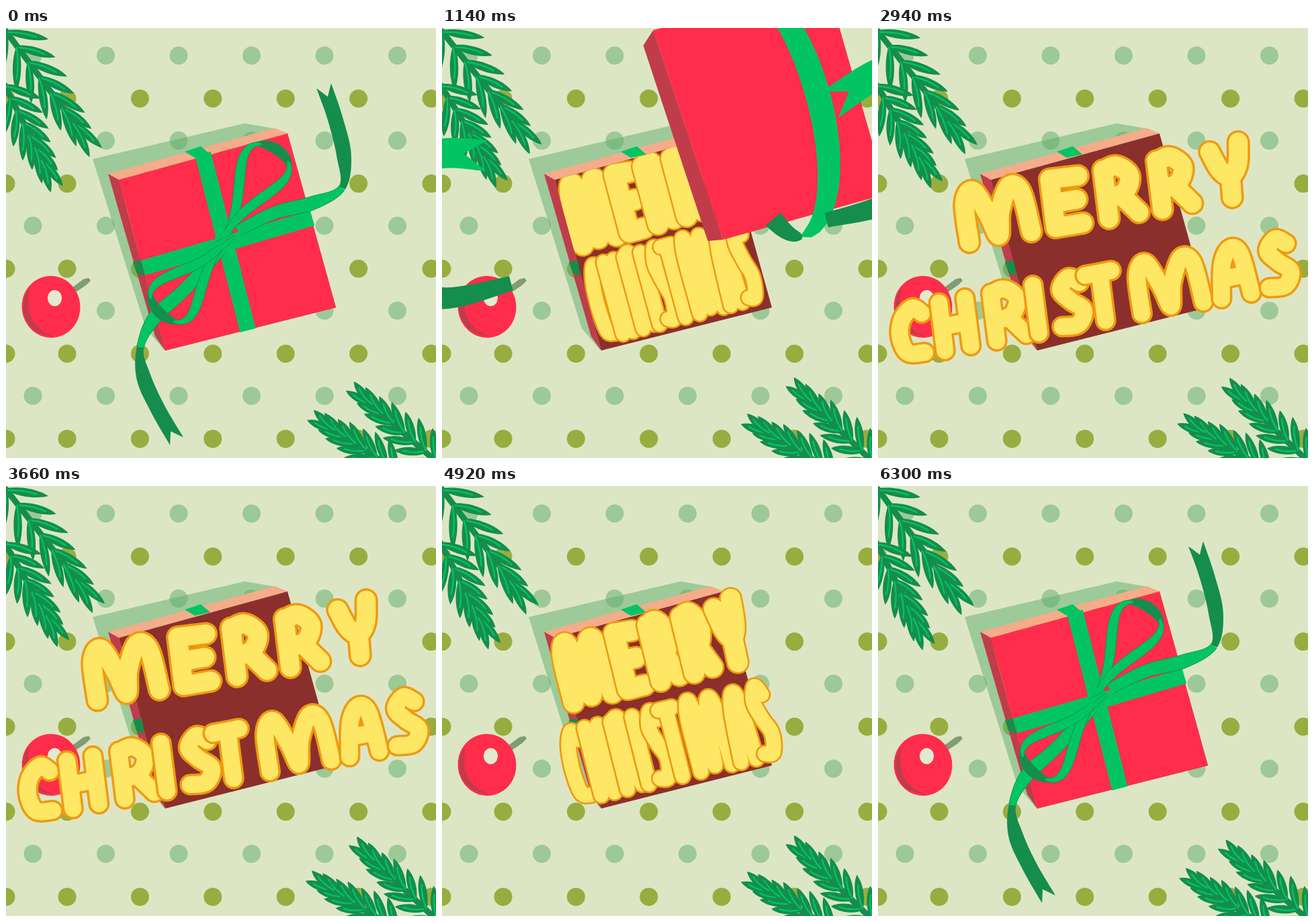
Animation, 640 px wide and 640 px high, one loop 6.42 s. Source, as an HTML page with a canvas:

```html
<!DOCTYPE html>
<html lang="en">
<head>
<meta charset="utf-8">
<title>Gift box</title>
<style>
html, body { margin: 0; width: 100%; height: 100%; overflow: hidden; background: #dde6c4; }
canvas { display: block; width: 640px; height: 640px; }
</style>
</head>
<body>
<canvas id="stage" width="640" height="640" role="img" aria-label="Merry Christmas"></canvas>
<script>
const ctx = document.getElementById('stage').getContext('2d');
const LOOP = 6420, STEP = 60, LAST = 6300;
const BRIGHT = [2, 196, 99], DARK = [20, 141, 77];
const RED = '#ff2d4b', SIDE = '#c03c4a', BROWN = '#8b2f2d', SEAM = '#0c9650';

// ---------- helpers ----------
const rgb = c => `rgb(${c.map(Math.round)})`;
const ramp = (t, a, b) => Math.min(1, Math.max(0, (t - a) / (b - a)));
const ease = k => k * k * (3 - 2 * k);
const lerp = (a, b, k) => a + (b - a) * k;
const mixPt = (p, q, k) => p.map((v, i) => lerp(v, q[i], k));
const mix = (a, b, k) => a.map((p, i) => mixPt(p, b[i], k));
const move = (pts, x, y) => pts.map(p => [p[0] + x, p[1] + y, ...p.slice(2)]);
const points = text => text.split(' ').map(p => p.split(',').map(Number));
const range = (n, f) => Array.from({ length: n + 1 }, (_, i) => f(i / n));

// Catmull-Rom through points of any dimension
function spline(pts, n = 9) {
  const out = [], at = i => pts[Math.min(pts.length - 1, Math.max(0, i))];
  const blend = (a, b, c, d, k) => {
    const cubic = 3 * (b - c) + d - a;
    const square = 2 * a - 5 * b + 4 * c - d;
    return b + k / 2 * (c - a + k * (square + k * cubic));
  };
  for (let i = 0; i < pts.length - 1; i++) {
    const [a, b, c, d] = [at(i - 1), at(i), at(i + 1), at(i + 2)];
    for (let s = 0; s < n; s++) out.push(b.map((v, j) => blend(a[j], v, c[j], d[j], s / n)));
  }
  out.push(at(pts.length - 1));
  return out;
}

function line(pts) {
  pts.forEach((p, i) => i ? ctx.lineTo(p[0], p[1]) : ctx.moveTo(p[0], p[1]));
}
function stroke(color, width) {
  ctx.strokeStyle = color;
  ctx.lineWidth = width;
  ctx.stroke();
}
function poly(pts, fill) {
  ctx.beginPath();
  line(pts);
  ctx.closePath();
  ctx.fillStyle = fill;
  ctx.fill();
}
function oval(x, y, rx, ry, fill, turn = 0) {
  ctx.beginPath();
  ctx.ellipse(x, y, rx, ry, turn, 0, 7);
  ctx.fillStyle = fill;
  ctx.fill();
}

// Ribbon along close points [x, y, width]
function band(path, color, { notch = false, edge = false } = {}) {
  const left = [], right = [], cut = [], last = path.length - 1;
  path.forEach((p, i) => {
    const a = path[Math.max(i - 1, 0)], b = path[Math.min(i + 1, last)];
    const dx = b[0] - a[0], dy = b[1] - a[1];
    const h = Math.max(p[2], 0) / 2 / (Math.hypot(dx, dy) || 1);
    left.push([p[0] - dy * h, p[1] + dx * h]);
    right.push([p[0] + dy * h, p[1] - dx * h]);
  });
  if (notch) {
    const e = path[last], b = path[last - 3];
    const d = e[2] * .75 / (Math.hypot(e[0] - b[0], e[1] - b[1]) || 1);
    cut.push(mixPt(e, b, d));
  }
  poly([...left, ...cut, ...right.slice().reverse()], rgb(color));
  if (edge) {
    ctx.beginPath();
    line(left);
    line(right);
    stroke(SEAM, 1);
  }
}

// ---------- scenery ----------
function backdrop() {
  ctx.fillStyle = '#dde6c4';
  ctx.fillRect(0, 0, 640, 640);
  for (let row = 0; row < 5; row++) {
    const y = 41 + row * 126.6;
    for (let i = 0; i < 6; i++) {
      oval(40 + i * 108.5, y, 13.5, 13.5, '#9cc997');
      oval(91 + i * 108.4, y + 64, 13.5, 13.5, '#98ad40');
    }
    oval(0, y + 64, 13.5, 13.5, '#98ad40');
  }
}

function leaf(x, y, angle, len) {
  ctx.save();
  ctx.translate(x, y);
  ctx.rotate(angle);
  ctx.beginPath();
  ctx.moveTo(-4, 0);
  ctx.bezierCurveTo(len * .3, -10, len * .8, -7, len, 0);
  ctx.bezierCurveTo(len * .75, 7, len * .3, 9, -4, 0);
  ctx.fillStyle = rgb(DARK);
  ctx.fill();
  ctx.beginPath();
  ctx.moveTo(2, 1);
  ctx.quadraticCurveTo(len * .4, -3.5, len * .72, 0);
  stroke(rgb(BRIGHT), 2.4);
  ctx.restore();
}

function branch(x, y, dx, dy, len, turn) {
  const dir = Math.atan2(dy, dx), pairs = 6;
  ctx.save();
  ctx.translate(x, y);
  ctx.rotate(turn * Math.PI / 180);
  ctx.lineCap = 'round';
  ctx.beginPath();
  line([[0, 0], [dx, dy]]);
  stroke(rgb(DARK), 9);
  for (let i = 0; i <= pairs; i++) {
    const k = i / pairs, spread = lerp(.75, .2, k);
    for (const side of [-1, 1]) {
      leaf(dx * k, dy * k, dir + side * spread, len * (1 - .1 * k + .06 * side * (i % 2)));
    }
  }
  ctx.restore();
}

// time, left sway, right sway
const SWAY = [[0, 0, 0], [720, 1, 1], [1860, .5, .5], [2940, .75, .75], [4320, .5, .5], [5280, 0, 1], [6300, 0, 0]];

function branches(t) {
  const next = Math.max(1, SWAY.findIndex(s => s[0] >= t));
  const [a, b] = [SWAY[next - 1], SWAY[next]];
  const [, l, r] = mixPt(a, b, ease(ramp(t, a[0], b[0])));
  branch(0, 5, 100, 135, 64, -2.3 * l);
  branch(-2, 85, 55, 110, 57, -6 * l);
  branch(640, 645, -95, -83, 50, 3.5 * r);
  branch(582, 660, -92, -60, 50, -3 * r);
}

function bauble() {
  poly(points('99,386 115,374 123,372 126,376 119,383 104,393'), '#7f9c74');
  oval(67, 415, 43.5, 46, RED, -.1);
  ctx.beginPath();
  ctx.moveTo(35, 387);
  ctx.bezierCurveTo(15, 415, 28, 458, 70, 458);
  ctx.bezierCurveTo(40, 448, 28, 425, 35, 387);
  ctx.fillStyle = SIDE;
  ctx.fill();
  oval(72.5, 402, 10.5, 12, '#e3ead0');
}

// ---------- box ----------
const FRONT = points('168,226 419,157 491,416 237,480');
const FLANK = points('152,217 168,226 237,480 222,459');
const LID = points('183,180 444,121 531,424 287,492');
const LID_FLANK = points('168,203 183,180 287,492 264,494');

function box() {
  poly(points('129,195 355,142 402,150 300,300 236,480 208,447'), 'rgba(95,176,110,.5)');
  poly(points('152,217 400,149 420,157 168,226'), '#f5ac8a');
  poly(FRONT, BROWN);
  poly(FLANK, SIDE);
  poly(points('266,184 290,176 304,188 281,193'), rgb(BRIGHT));
  poly(points('189,348 202,346 206,369 194,364'), rgb(DARK));
}

// ---------- lettering: advance and strokes on a grid ten units high ----------
const GLYPHS = {
  M: [12.8, '0,10 0,2 2,-.3 4.5,5 6.1,9.6 7,4.7 9.4,0 11.7,1.6 12.8,10'],
  E: [6, '0,0 0,10', '0,0 5.8,.3', '0,5 5,5', '0,10 5.6,10'],
  R: [6, '0,0 0,10', '0,.2 2.8,-.4 5.2,2 4,5 1.5,5.8', '3,5.6 6.2,9.8'],
  Y: [6, '0,0 1.6,4 3.6,5.6 5.3,3.5 6,-1', '3.6,5.6 3.4,10'],
  C: [5, '5,1.4 3.2,0 .8,2 0,5.5 1.2,9 4.6,9.6'],
  H: [7, '0,0 0,10', '5.4,0 5.4,10', '0,5 5.4,5'],
  I: [.1, '-1,0 -1,10'],
  S: [4.8, '4.6,1.2 2.5,-.2 .6,2 2.4,4.6 4.8,7 3.4,9.7 0,9.6'],
  T: [4.2, '-2.6,0 2.8,0', '.4,0 .4,10'],
  A: [6.2, '0,10 1,3 3,0 5,1.6 6.2,10', '.6,6 5.6,6']
};
// Frames: origin, along the line, down the letters
const WORDS = [
  { text: 'MERRY', gap: 5, pen: [35, 35],
    packed: points('187,237 220,-61 23,86'), open: points('127,247 410,-70 9,72') },
  { text: 'CHRISTMAS', gap: 3.8, pen: [26, 32],
    packed: points('216,355 226,-60 29,107'), open: points('28,421 580,-109 9,71') }
];

function drawWord({ text, gap, pen, packed, open }, k) {
  const [o, along, down] = mix(packed, open, k), width = lerp(...pen, k);
  const total = [...text].reduce((sum, c) => sum + GLYPHS[c][0] + gap, -gap);
  const place = (x, y) => o.map((v, i) => v + along[i] * x / total + down[i] * y / 10);
  let pos = 0;
  for (const c of text) {
    const [advance, ...strokes] = GLYPHS[c];
    ctx.beginPath();
    for (const s of strokes) line(spline(points(s).map(([x, y]) => place(pos + x, y))));
    stroke('#ef9a10', width);
    stroke('#ffe766', width - lerp(5, 7, k));
    pos += advance + gap;
  }
}

function lettering(t) {
  const k = ramp(t, 2040, 2640) - 1;
  const out = t < 3500 ? 1 + 2.4 * k ** 3 + 1.4 * k * k : 1 - ramp(t, 4380, 4980) ** 2;
  ctx.save();
  ctx.lineCap = ctx.lineJoin = 'round';
  if (out < .02) {
    ctx.beginPath();
    line(FRONT);
    ctx.clip();
  }
  for (const word of WORDS) drawWord(word, out);
  ctx.restore();
}

// ---------- ribbon ----------
// Poses: tied, loose, lifted; each runs from the knot over the fold to the tip
const RIGHT = [
  '345,302 400,275 455,261 500,238 503,190 490,135 473,86',
  '290,333 350,302 400,263 480,259 550,243 594,195 597,142',
  '471,286 560,262 640,212 712,130 680,80 575,58 476,114'
].map(points);
const LEFT = [
  '320,330 265,390 222,430 200,475 205,520 226,567 254,615',
  '325,318 268,330 220,378 140,430 85,500 95,560 131,588',
  '204,380 110,402 40,388 -14,325 10,245 85,190 168,190'
].map(points);
const WIDTHS = [[16, 23], [22, 26], [22, 46]];

function tail(poses, loose, lift, dx) {
  const blend = set => mix(mix(set[0], set[1], loose), set[2], lift);
  const [thin, wide] = mixPt(mixPt(WIDTHS[0], WIDTHS[1], loose), WIDTHS[2], lift);
  const path = spline(move(blend(poses), dx, 0).map((p, i) => {
    const pinch = i === 3 ? lerp(.5, 1, loose) : 1;
    return [...p, lerp(thin, wide, Math.sqrt(i / 6)) * pinch];
  }));
  const fold = path.length >> 1;
  band(path.slice(fold), mixPt(DARK, BRIGHT, loose), { notch: true });
  band(path.slice(0, fold + 1), mixPt(BRIGHT, DARK, lift), { edge: lift < .1 });
}

// Part of the tilted ellipse that the strap forms when lifted
function arch(from, to, depth) {
  return range(24, k => {
    const a = lerp(from, to, k), across = depth * Math.cos(a), along = 199 * Math.sin(a);
    return [350 + across * .962 + along * .274, 295 - across * .274 + along * .962,
      4 + 33 * Math.sqrt(Math.abs(Math.cos(a)))];
  });
}
const STRAP = range(24, k => [293 + 67 * k, 187 + 263 * k, 24]);
const ARCH = arch(-Math.PI / 2, Math.PI / 2, 80);
const ARCH_ENDS = [arch(-.76, -Math.PI / 2, -60), arch(.96, Math.PI / 2, -60)];

// One teardrop loop of the bow; its far end shows the back of the ribbon
function bowLoop(x, y, angle, len, size) {
  const c = Math.cos(angle), s = Math.sin(angle);
  const part = (from, to, width) => range(20, k => {
    const a = lerp(from, to, k) * Math.PI;
    const along = len * Math.sin(a) * size, across = -46 * Math.sin(2 * a) * Math.sin(a) * size;
    return [lerp(327, x, size) + along * c - across * s, lerp(315, y, size) + along * s + across * c,
      width(k) * Math.sqrt(size)];
  });
  const side = k => 4 + 11 * Math.sin(Math.PI * lerp(.15, 1, k));
  band(part(.36, .67, k => 15 * Math.sin(Math.PI * k)), DARK, { edge: true });
  band(part(0, .42, side), BRIGHT, { edge: true });
  band(part(1, .6, side), BRIGHT, { edge: true });
}

function bow(size) {
  bowLoop(328, 306, -1.05, 146, size);
  bowLoop(321, 324, 2.3, 136, size);
  oval(327, 315, 16 * size, 14 * size, rgb(BRIGHT), .5);
  ctx.beginPath();
  for (const d of [0, 6, 12]) {
    ctx.moveTo(327 + (d - 14) * size, 315 + (d + 3) * size);
    ctx.quadraticCurveTo(327 + d * size, 315 - 4 * size, 327 + 14 * size, 315 + (d - 12) * size);
  }
  stroke(SEAM, 1);
}

function wrapping(t) {
  const opening = t < 3200;
  const phase = (a, b, c, d) => opening ? ramp(t, a, b) : 1 - ramp(t, c, d);
  const loose = ease(phase(0, 700, 5600, 6280));
  const lift = ease(phase(720, 1020, 5280, 5580));
  const away = phase(1020, 1320, 4980, 5280) ** 1.5;
  if (away === 1) return;

  const fly = pts => move(pts, 520 * away, -700 * away);
  if (lift > 0) poly(fly(mix(FLANK, LID_FLANK, lift)), SIDE);
  poly(fly(mix(FRONT, LID, lift)), RED);

  if (lift < 1) {
    for (const end of [[204, 357, 23], [456, 283, 23]]) band([end, mixPt([327, 321, 23], end, lift)], BRIGHT);
  }
  if (lift > 0) {
    ARCH_ENDS.forEach((part, i) => {
      const hinge = STRAP[i * 24];
      band(fly(part.map(p => mixPt(hinge, p, lift))), DARK);
    });
  }
  band(fly(mix(STRAP, ARCH, lift)), BRIGHT);

  tail(RIGHT, loose, lift, 400 * away);
  tail(LEFT, loose, lift, -400 * away);
  if (loose < .98) bow(1 - loose);
}

function draw(now) {
  const t = Math.min(LAST, Math.floor(now % LOOP / STEP) * STEP);
  backdrop();
  branches(t);
  bauble();
  box();
  lettering(t);
  wrapping(t);
}

const start = performance.now();
function tick() {
  draw(performance.now() - start);
  requestAnimationFrame(tick);
}
tick();
</script>
</body>
</html>
```
